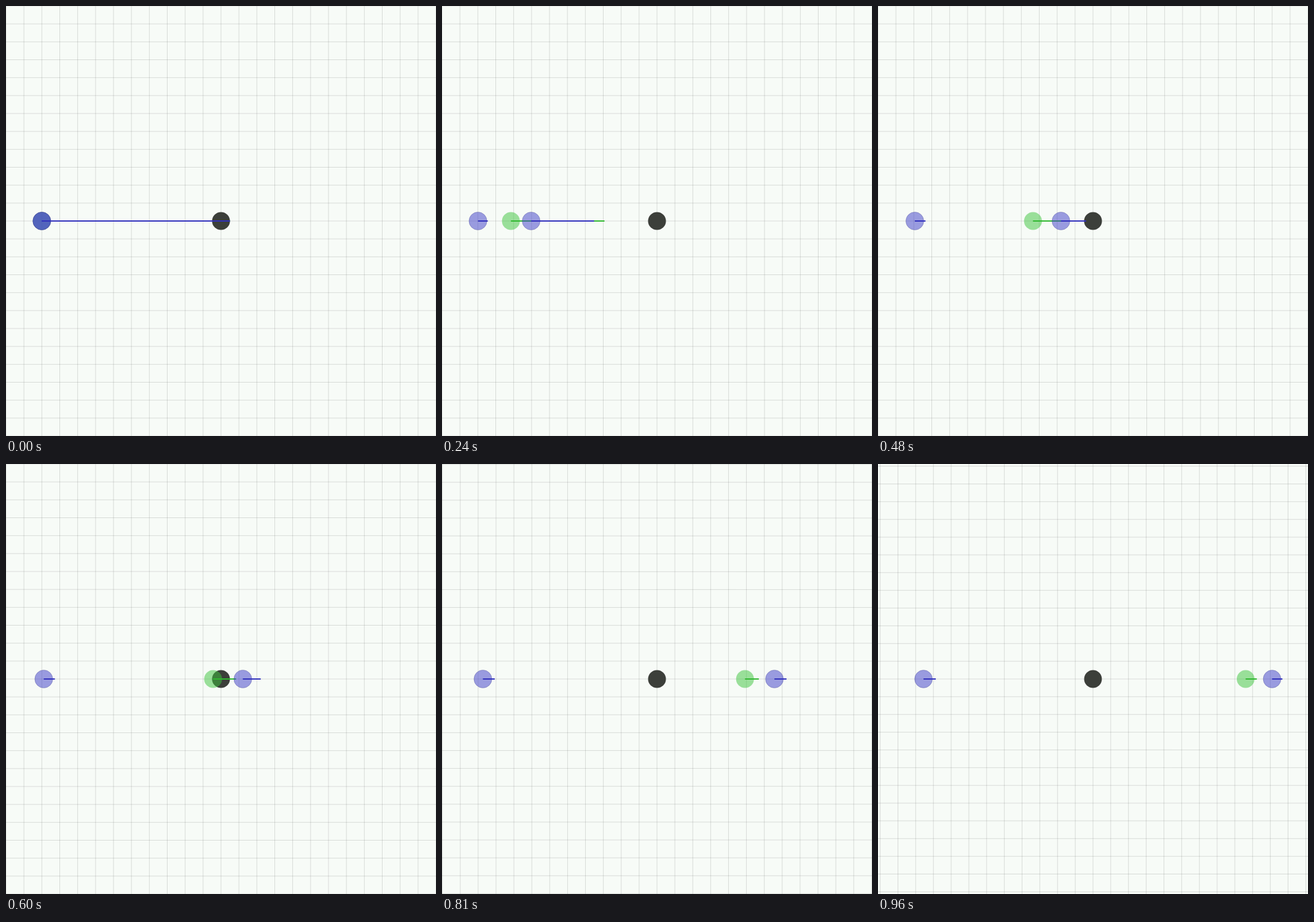
These frames come from a looping animation (700x700 px, 990 ms). An HTML page with a canvas:

```html
<!DOCTYPE html>
<html>
<head>
<meta charset="utf-8">
<style>
html, body { margin: 0; width: 100%; height: 100%; overflow: hidden; background: #f7fbf7; }
canvas { display: block; }
</style>
</head>
<body>
<canvas id="stage" width="700" height="700"></canvas>
<script>
const ctx = document.getElementById('stage').getContext('2d');
const LOOP = 990, STEP = 30, MID = 350, START = -10;
const BLUE = [60, 60, 200], GREEN = [60, 195, 60];
let scale;

const px = x => MID + x * scale;

// Distance covered by the fast body: quick start, peak speed at 0.66 s.
function travel(t) {
  if (t <= 0) return 0;
  const cubic = 25.7 * t - 41 / 3 * ((t - 0.66) ** 3 + 0.66 ** 3);
  return cubic - 0.275 * (1 - Math.exp(-t / 0.035));
}

const pull = t => 10 * Math.exp(-5 * Math.max(0, t));

function drawGrid() {
  ctx.strokeStyle = 'rgba(0, 0, 0, 0.13)';
  ctx.lineWidth = 1;
  ctx.beginPath();
  for (let i = -12; i <= 12; i++) {
    const p = px(i);
    ctx.moveTo(p, 0);
    ctx.lineTo(p, 700);
    ctx.moveTo(0, p);
    ctx.lineTo(700, p);
  }
  ctx.stroke();
}

function disc(x, fill, edge) {
  ctx.beginPath();
  ctx.arc(px(x), MID, scale / 2, 0, 2 * Math.PI);
  ctx.fillStyle = fill;
  ctx.fill();
  if (edge) {
    ctx.strokeStyle = edge;
    ctx.lineWidth = 1;
    ctx.stroke();
  }
}

function body(x, force, rgb, edge) {
  disc(x, `rgba(${rgb}, 0.5)`, edge);
  ctx.strokeStyle = `rgb(${rgb.map(c => Math.max(45, c - 12))})`;
  ctx.lineWidth = 2;
  ctx.beginPath();
  ctx.moveTo(px(x), MID);
  ctx.lineTo(px(x + 0.5 + force), MID);
  ctx.stroke();
}

function draw(now) {
  const t = Math.floor(now % LOOP / STEP) * STEP / 1000;
  const zoom = Math.max(0, (t - 0.54) / 0.42);
  scale = MID / (12 + 0.125 * zoom ** 4);

  ctx.fillStyle = '#f7fbf7';
  ctx.fillRect(0, 0, 700, 700);
  drawGrid();
  disc(0, '#3c3f3a');
  const blueEdge = 'rgba(50, 50, 130, 0.3)';
  body(START + travel(t - 0.0655), pull(t - 0.09), GREEN);
  body(START + 0.5 * t ** 3, 0.2 * t, BLUE, blueEdge);
  body(START + travel(t), pull(t), BLUE, blueEdge);
}

const begin = performance.now();
function tick() {
  draw(performance.now() - begin);
  requestAnimationFrame(tick);
}
tick();
</script>
</body>
</html>
```
